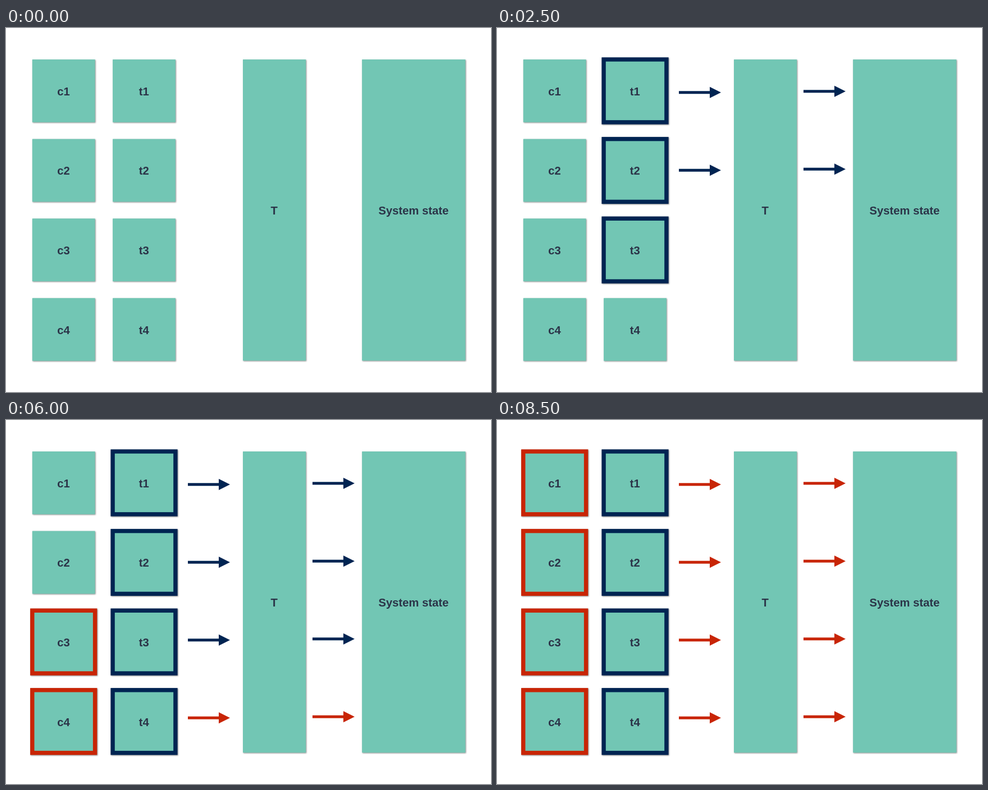
An HTML page that plays this animation: 864x648 px, repeating every 9.5 s.

```html
<!DOCTYPE html>
<html lang="en">
<head>
<meta charset="utf-8">
<title>System state</title>
<style>
  html, body { margin: 0; width: 100%; height: 100%; overflow: hidden; background: #fff; }
  svg { display: block; width: 864px; height: 648px; }
  rect { fill: #72c6b4; stroke-width: 7.4; filter: drop-shadow(1px 1px 1px rgba(0, 0, 0, .45)); }
  text { font: bold 20.25px "Liberation Sans", Arial, sans-serif; fill: #2b3448; text-anchor: middle; }
</style>
</head>
<body>
<svg id="stage" viewBox="0 0 864 648"></svg>
<script>
const NAVY = '#002452', RED = '#c82506';
const LOOP = 9500, STEP = 500;
const stage = document.getElementById('stage');

function add(tag, attrs, text = '') {
  const el = document.createElementNS('http://www.w3.org/2000/svg', tag);
  for (const key in attrs) el.setAttribute(key, attrs[key]);
  el.textContent = text;
  stage.append(el);
  return el;
}

function box(x, y, width, height, label) {
  const rect = add('rect', { x, y, width, height });
  add('text', { x: x + width / 2 - 0.3, y: y + height / 2 + 7.8 }, label);
  return rect;
}

function arrow(x, y) {
  return add('path', { d: `M${x} ${y - 2.5}h55v-7.5l20 10l-20 10v-7.5h-55z` });
}

const rows = [0, 1, 2, 3].map(i => {
  const y = 56 + i * 141.6;
  return {
    c: box(46.8, y, 111.8, 111.8, 'c' + (i + 1)),
    t: box(190.1, y, 111.8, 111.8, 't' + (i + 1)),
    arrows: [arrow(324, 114.7 + i * 138.5), arrow(546, 112.8 + i * 138.5)]
  };
});
box(422, 56, 112.2, 536.2, 'T');
box(634.2, 56, 184.2, 536.2, 'System state');

// Steps at which each row runs forward (navy) and is then rolled back (red).
const plan = rows.map((row, i) => ({
  run: 1 + 2 * i,
  cancel: i === 3 ? 9 : Infinity,
  undo: 16 - 2 * i
}));

function arrowColor(step, { run, cancel, undo }) {
  if (step > undo) return RED;
  return step > run && step < cancel ? NAVY : 'none';
}

function draw(step) {
  rows.forEach((row, i) => {
    const p = plan[i];
    row.t.style.stroke = step >= p.run ? NAVY : 'none';
    row.c.style.stroke = step >= p.undo ? RED : 'none';
    for (const a of row.arrows) a.style.fill = arrowColor(step, p);
  });
}

let start, shown = -1;
function tick(now) {
  start ??= now;
  const step = Math.floor((now - start) % LOOP / STEP);
  if (step !== shown) draw(shown = step);
  requestAnimationFrame(tick);
}
draw(0);
requestAnimationFrame(tick);
</script>
</body>
</html>
```
